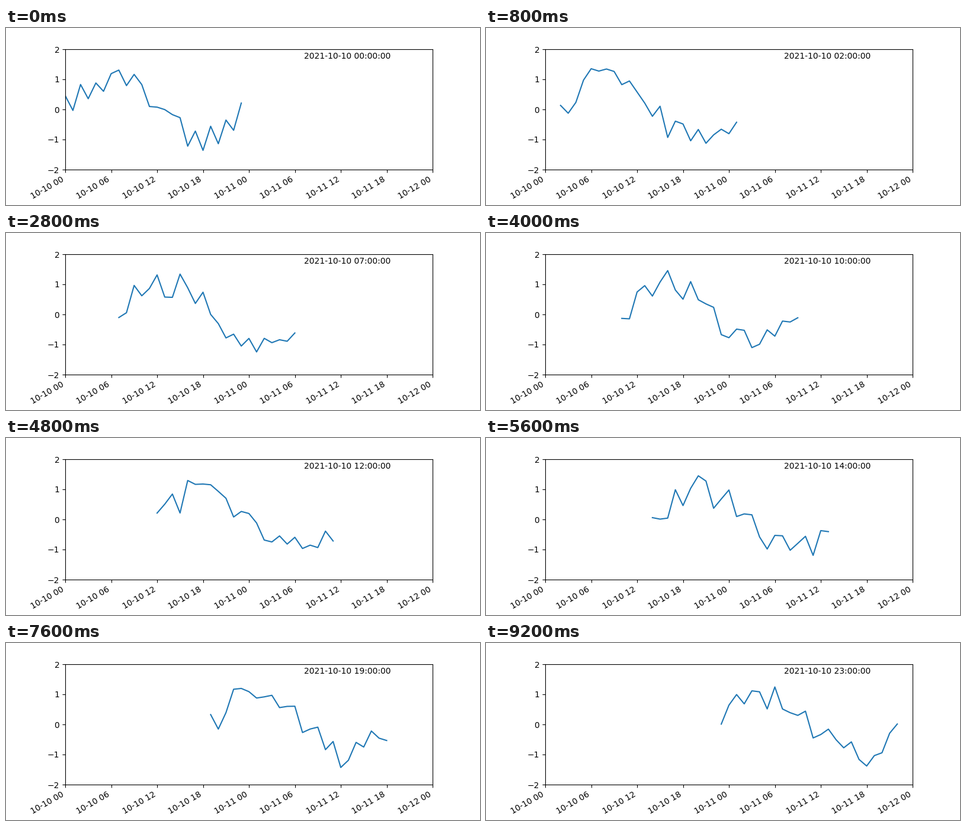
Write a matplotlib script that moves like this. It is 800x300 px and loops after 9600 ms.

```python
import matplotlib.dates as mdates
import matplotlib.pyplot as plt
import numpy as np
from matplotlib.animation import FuncAnimation

HOURS = 24
START = np.datetime64("2021-10-10T00")
steps = np.arange(HOURS)

# Each hour shows one sine period with fresh uniform noise.
rng = np.random.default_rng(10)
wave = np.sin(2 * np.pi * steps / HOURS)
curves = wave + rng.uniform(-0.5, 0.5, (HOURS, HOURS))

fig, ax = plt.subplots(figsize=(8, 3), dpi=100)
line, = ax.plot(START + steps, curves[0])
ax.set_xlim(START, START + 2 * HOURS)
ax.set_ylim(-2, 2)
ax.xaxis.set_major_locator(mdates.HourLocator(byhour=range(0, 24, 6)))
ax.xaxis.set_major_formatter(mdates.DateFormatter("%m-%d %H"))
fig.autofmt_xdate()
stamp = ax.text(0.65, 0.92, "", transform=ax.transAxes)


def update(hour):
    line.set_data(START + hour + steps, curves[hour])
    stamp.set_text(f"2021-10-10 {hour:02d}:00:00")
    return line, stamp


anim = FuncAnimation(fig, update, frames=HOURS, interval=400, repeat=True, repeat_delay=0)
plt.show()
```
